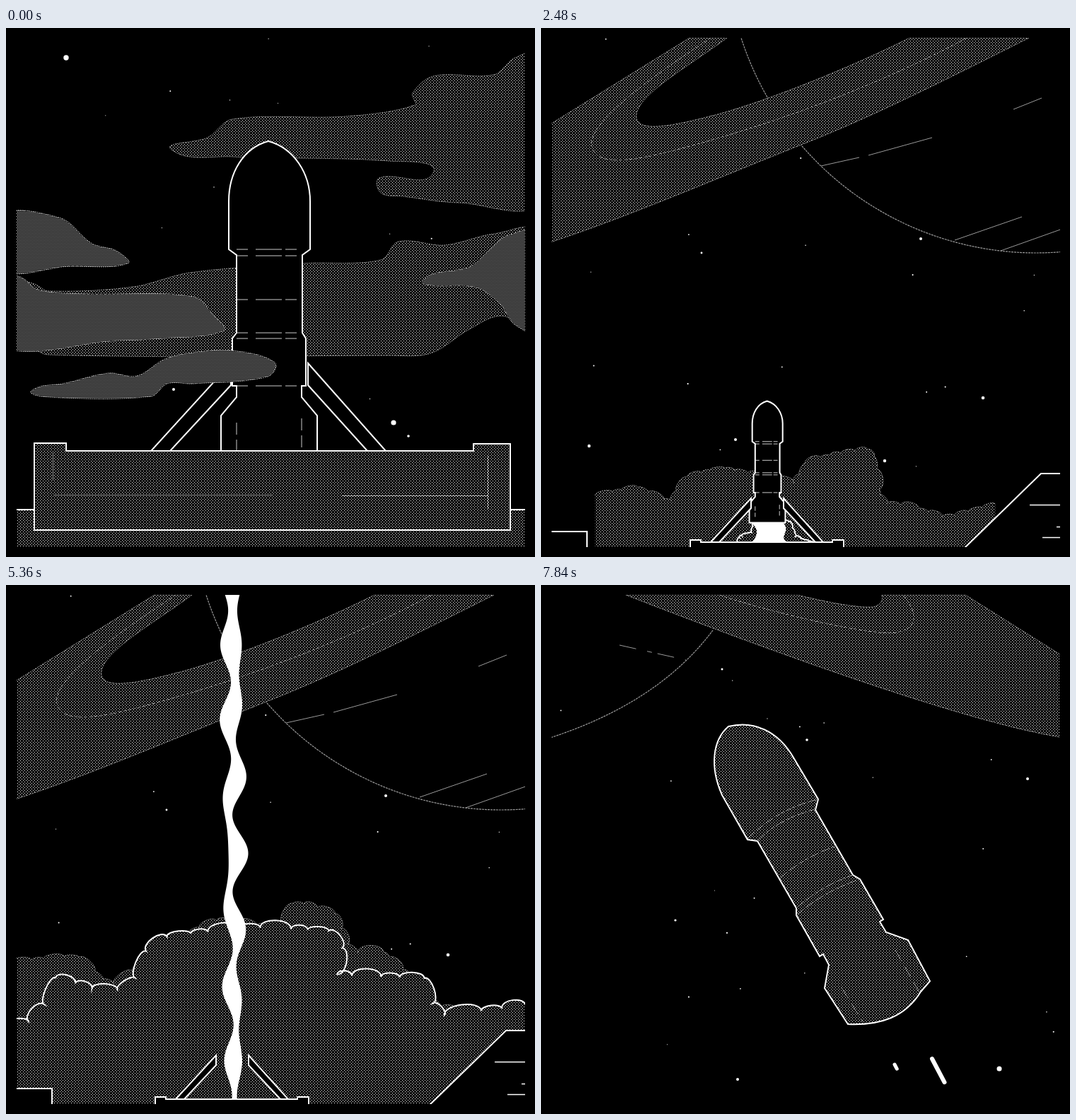
An HTML page with a canvas that plays this animation: 748 px wide and 748 px high, repeating every 8 s.

```html
<!DOCTYPE html>
<html lang="en">
<head>
<meta charset="utf-8">
<title>Lift-off</title>
<style>
  html, body { margin: 0; height: 100%; background: #000; overflow: hidden; }
  canvas { display: block; width: 748px; height: 748px; }
</style>
</head>
<body>
<canvas id="stage" width="748" height="748"></canvas>
<script>
const ctx = document.getElementById('stage').getContext('2d');
const LOOP = 8000, STEP = 80, LAUNCH_AT = 800, SPACE_AT = 5600;
const WHITE = '#fff', SOFT = '#999', BLACK = '#000', TAU = Math.PI * 2;

// ---------- helpers ----------
function dotScreen(width, height, rowShift) {
  const tile = document.createElement('canvas');
  tile.width = width;
  tile.height = height * 2;
  const g = tile.getContext('2d');
  g.fillRect(0, 0, width, height * 2);
  g.fillStyle = WHITE;
  g.fillRect(0, 0, 1, 1);
  g.fillRect(rowShift, height, 1, 1);
  return ctx.createPattern(tile, 'repeat');
}
const DIM = dotScreen(4, 2, 2), BRIGHT = dotScreen(2, 2, 1);

const mix = (a, b, k) => a + (b - a) * k;
const random = n => { const s = Math.sin(n * 12.9898) * 43758.5453; return s - Math.floor(s); };
const points = text => text.trim().split(/\s+/).map(p => p.split(',').map(Number));

function shape(d, fill, stroke, width = 1, dash = []) {
  const path = typeof d === 'string' ? new Path2D(d) : d;
  if (fill) { ctx.fillStyle = fill; ctx.fill(path); }
  if (stroke) {
    ctx.strokeStyle = stroke;
    ctx.lineWidth = width;
    ctx.setLineDash(dash);
    ctx.stroke(path);
  }
}
function disc(x, y, r) {
  ctx.fillStyle = WHITE;
  ctx.beginPath();
  ctx.arc(x, y, r, 0, TAU);
  ctx.fill();
}
function stars(seed, bright) {
  for (let i = 0; i < 26; i++) {
    const n = seed + i * 3;
    disc(15 + 719 * random(n), 15 + 640 * random(n + 1), 0.5 + 0.6 * random(n + 2));
  }
  for (const [x, y, r] of bright) disc(x, y, r);
}

// Closed smooth curve through a few points.
function smooth(list) {
  const path = new Path2D(), n = list.length, at = i => list[(i + n) % n];
  const handle = (i, reach) => {
    const [ax, ay] = at(i - 1), [bx, by] = at(i + 1), [x, y] = at(i);
    const size = reach / Math.hypot(bx - ax, by - ay);
    return [x + (bx - ax) * size, y + (by - ay) * size];
  };
  path.moveTo(...at(0));
  for (let i = 0; i < n; i++) {
    const [p, q] = [at(i), at(i + 1)], reach = 0.33 * Math.hypot(q[0] - p[0], q[1] - p[1]);
    path.bezierCurveTo(...handle(i, reach), ...handle(i + 1, -reach), ...q);
  }
  return path;
}

// ---------- launch pad, close up ----------
const cloud = text => smooth(points(text));
const farClouds = [
  cloud('760,36 720,42 690,66 605,68 575,92 578,109 480,125 320,129 285,155 234,172 320,182 540,188 604,205 528,212 530,233 562,238 640,247 760,242'),
  cloud('-20,350 40,362 60,372 180,366 260,346 420,333 530,328 555,302 620,307 690,291 760,290 760,425 700,407 655,426 600,460 540,463 60,462 25,447 -20,447')];
const nearClouds = [
  cloud('-20,268 75,268 122,305 156,315 172,333 90,337 -20,340'),
  cloud('-20,350 20,352 45,370 110,376 265,380 295,408 308,428 220,439 160,442 -20,446'),
  cloud('760,291 710,293 682,315 655,338 600,349 590,362 665,367 700,392 720,420 760,430')];
const lowCloud = cloud('36,513 85,502 145,488 185,492 225,468 272,458 320,456 380,473 370,493 265,503 228,503 205,521 60,522');

function rocket(scale) {
  shape('M315,313 V245 C315,205 335,170 371,160 C407,170 430,205 430,245 V313 L419,321 V431 L424,439 V506 H418 V522 L440,548 V620 H304 V548 L326,522 V506 H320 V439 L326,431 V321Z',
    BLACK, WHITE, 2 / scale);
  for (const y of [313, 322, 384, 431, 439, 506]) shape(`M326,${y} H419`, null, WHITE, 0.8 / scale, [16, 11, 37, 5]);
  shape('M326,558 V598 M418,552 V598', null, WHITE, 0.8 / scale, [17, 7]);
}
function drift(list, tone, dx) {
  ctx.save();
  ctx.translate(dx, 0);
  for (const path of list) shape(path, tone, SOFT, 1, [2, 1]);
  ctx.restore();
}
function drawPad(t) {
  const dx = -t / 100;
  stars(5, [[85, 42, 3.7], [548, 558, 3.6], [237, 511, 2], [569, 577, 1.8]]);
  drift(farClouds, DIM, dx / 2);
  drift(nearClouds, BRIGHT, dx);
  shape('M318,474 V505 L232,598 H205Z M427,474 V505 L511,598 H537Z', BLACK, WHITE, 2);
  rocket(1);
  drift([lowCloud], BRIGHT, dx * 1.5);
  shape('M0,681 H748 V748 H0Z', DIM);
  shape('M0,681 H40 M713,681 H748', null, WHITE, 2);
  shape('M40,710 V587 H85 V598 H661 V588 H713 V710Z', DIM, WHITE, 2);
  shape('M67,660.5 H378 M475,661.5 H681 M66.5,600 V640 M681.5,605 V680', null, SOFT);
}

// ---------- lift-off ----------
// Ridge lines of the smoke at a few moments; the puffs are grown along them.
const shrink = (list, k) => list.map(([x, y]) => [mix(320, x, k), mix(760, y, k)]);
const backEarly = points('150,735 165,710 190,685 205,668 250,660 320,690 350,655 435,622 450,690 465,735 500,730 535,735');
const frontEarly = points('212,738 212,690 225,657 268,645 275,603 300,598 345,598 395,607 420,662 478,682 510,692 535,738');
const backSmoke = [
  [900, shrink(backEarly, 0.15)], [1600, backEarly],
  [3280, points('10,594 110,594 175,658 203,607 255,586 395,602 400,570 500,570 508,655 580,624 640,660 740,617')],
  [5360, points('5,534 100,524 148,568 186,542 290,474 388,487 408,447 465,465 487,520 535,520 620,602 740,606')]];
const frontSmoke = [
  [2000, shrink(frontEarly, 0.05)], [3280, frontEarly],
  [4400, points('66,738 90,675 105,630 182,608 235,568 275,502 345,488 410,525 480,592 570,608 595,674 695,648')],
  [5360, points('5,618 50,617 62,553 148,578 195,548 200,500 345,484 480,490 468,552 595,556 608,610 735,595')]];

function ridgeAt(keys, t) {
  let i = 0;
  while (i < keys.length - 2 && t >= keys[i + 1][0]) i++;
  const [t0, a] = keys[i], [t1, b] = keys[i + 1], k = (t - t0) / (t1 - t0);
  return a.map(([x, y], j) => [mix(x, b[j][0], k), mix(y, b[j][1], k)]);
}
function walk(line, share) {
  const sizes = line.slice(1).map(([x, y], i) => Math.hypot(x - line[i][0], y - line[i][1]));
  let left = share * sizes.reduce((a, b) => a + b), i = 0;
  while (i < sizes.length - 1 && left > sizes[i]) left -= sizes[i++];
  const k = left / sizes[i];
  return [mix(line[i][0], line[i + 1][0], k), mix(line[i][1], line[i + 1][1], k)];
}
function smoke(keys, t, count, stroke, width, dash) {
  if (t < keys[0][0]) return;
  const ridge = ridgeAt(keys, t), outline = new Path2D();
  let [px, py] = ridge[0];
  outline.moveTo(px, py);
  for (let i = 1; i <= count; i++) {
    const jitter = i < count ? 0.7 * (random(i + count) - 0.5) : 0;
    const [x, y] = walk(ridge, (i + jitter) / count);
    const lift = mix(0.2, 0.4, random(i * 7 + count));
    const [nx, ny] = [(y - py) * lift, (px - x) * lift];
    outline.bezierCurveTo(px + nx, py + ny, x + nx, y + ny, x, y);
    [px, py] = [x, y];
  }
  const body = new Path2D(outline);
  body.lineTo(px, 760);
  body.lineTo(ridge[0][0], 760);
  shape(body, DIM);
  shape(outline, null, stroke, width, dash);
}

// White column with swellings that sink from the nozzle to the pad.
function drawExhaust(t, nozzle) {
  if (t < 1100) return;
  const top = Math.max(14, Math.min(nozzle, 720)), spread = Math.max(0, (4400 - t) / 1120);
  const flow = 0.266 * (t - 5360), right = [], body = new Path2D();
  for (let y = top; y <= 727; y++) {
    const u = (y - top) / (727 - top);
    const centre = 320 + 3 * u + 7 * Math.sin(Math.PI * u) * Math.cos((y - 380 - flow) / 120 * TAU);
    const half = 11 - 3 * u + 4.5 * Math.cos((y - 85 - flow) / 98 * TAU) / (1 + spread) + spread * (6 + 5 * u ** 6);
    body.lineTo(centre - half, y);
    right.unshift([centre + half, y]);
  }
  for (const p of right) body.lineTo(...p);
  shape(body, WHITE);
}
function drawSparks(t, nozzle) {
  const age = (t - 3140) % 560 + (t < 3140 ? 560 : 0);
  if (t < 1400 || age > 300) return;
  const y = Math.min(nozzle + 20, 585) + age * 0.35;
  for (const side of [-1, 1]) {
    const x = 320 + side * (22 + age * 0.1);
    shape(`M${x},${y} l${side * 13},22`, null, WHITE, 2);
  }
}

function drawLaunch(t) {
  const rise = 359 * (Math.max(0, t - 1600) / 2800) ** 2.32, nozzle = 724 - rise, scale = 0.374;
  stars(90, [[625, 523, 2.3], [537, 298, 2], [227, 318, 1.4], [275, 582, 2], [68, 591, 2.2], [486, 612, 2.2]]);
  const planet = new Path2D();
  planet.arc(700, -120, 438, 0, TAU);
  shape(planet, BLACK, SOFT, 1.2, [3, 1]);
  shape('M396,195 L450,183 M463,180 L553,155 M668,115 L708,99 M585,300 L680,267 M650,315 L740,283', null, SOFT);
  shape('M10,138 L210,14 H263 C200,60 130,98 135,128 C140,150 200,135 250,122 C330,100 450,50 521,14 H690 C570,74 470,125 368,165 C250,212 120,268 10,304Z',
    DIM, SOFT, 1, [3, 1]);
  shape('M240,14 C140,80 60,140 73,170 C80,195 130,188 180,175 C320,140 480,80 602,14', null, SOFT, 1, [5, 2]);

  smoke(backSmoke, t, 36, SOFT, 1, [2, 1]);
  smoke(frontSmoke, t, 27, WHITE, 2);

  ctx.save();
  ctx.translate(320 - 372 * scale, 552 - rise - 160 * scale);
  ctx.scale(scale, scale);
  rocket(scale);
  ctx.restore();
  drawExhaust(t, nozzle);
  drawSparks(t, nozzle);

  shape('M297,665 V679 L252,727 H240Z M343,665 V679 L388,727 H399Z', BLACK, WHITE, 2);
  shape('M211,740 V724 H226 V727 H412 V724 H428 V740Z', BLACK, WHITE, 2);
  shape('M594,740 L707,630 H750 V750Z M0,712 H65 V750 H0Z', BLACK, WHITE, 2);
  shape('M691,674.5 H740 M729,705.5 H740 M709,720.5 H740', null, WHITE, 1.3);
}

// ---------- in space ----------
const AXIS = [0.46, 0.87];

function drawThrust(t) {
  const length = t < 6720
    ? mix(1, 1.5, (6720 - t) / 1120) + 0.12 * Math.sin((6720 - t) / 90)
    : 1 - (t - 6720) / 560;
  for (let s = 0; s < 80 * length; s++) {
    disc(498 + AXIS[0] * s, 607 + AXIS[1] * s, (17 + 6 * Math.cos(s / 80 * TAU)) * Math.min(1, length + 0.2));
  }
}
// Scraps of flame: time, place at that time, width, length.
const embers = [[6720, 584, 584, 14, 0.1], [6720, 607, 629, 9, 0.1], [6720, 396, 648, 5, 12], [6720, 470, 700, 7, 22],
  [7840, 500, 678, 5, 7], [7840, 553, 670, 6, 38]];

function drawEmbers(t) {
  ctx.lineCap = 'round';
  for (const [time, x, y, width, length] of embers) {
    const age = t - time, far = age * 0.08;
    if (Math.abs(age) > 300) continue;
    shape(`M${x + AXIS[0] * far},${y + AXIS[1] * far} l${AXIS[0] * length},${AXIS[1] * length}`, null, WHITE, width);
  }
  ctx.lineCap = 'butt';
}
function drawSpace(t) {
  stars(200, [[648, 684, 3.5], [688, 274, 2], [278, 699, 2], [376, 219, 1.8], [190, 474, 1.6], [256, 119, 1.5]]);
  shape('M243,64 C190,135 110,185 10,217', null, SOFT, 1.2, [3, 1]);
  shape('M111,85 L205,106', null, SOFT, 1, [24, 16, 7, 8]);
  shape('M120,14 H362 C420,28 450,32 470,31 C482,28 484,20 482,14 H600 L740,102 V216 C600,195 300,84 120,14Z', DIM, SOFT, 1, [3, 1]);
  shape('M252,14 C330,40 440,65 490,68 C530,68 538,45 512,14', null, SOFT, 1, [5, 2]);

  drawThrust(t);
  drawEmbers(t);
  ctx.save();
  ctx.translate(0, 0.5 - 0.5 * Math.cos((t - 6720) / 1120 * Math.PI));
  shape('M265,199 C300,190 335,205 357,243 L392,302 L388,317 L441,409 L451,415 L484,472 L479,475 L488,490 L519,501 L550,559 L537,574 C515,610 480,622 434,620 L401,569 L407,536 L399,521 L394,524 L361,466 V456 L306,361 L292,359 L256,296 C238,255 243,218 265,199Z',
    DIM, WHITE, 2);
  shape('M292,358 Q335,315 392,302 M306,361 Q335,330 388,316 M338,413 Q375,382 418,368 M361,456 Q395,425 441,409 M361,466 Q400,432 451,415',
    null, SOFT, 1, [14, 3]);
  shape('M425,568 L455,617 M501,515 L535,575', null, SOFT, 1, [18, 8]);
  ctx.restore();
}

// ---------- playback ----------
const start = performance.now();
function frame() {
  const clock = (performance.now() - start) % LOOP;
  const t = Math.floor(clock / STEP) * STEP;
  ctx.fillStyle = BLACK;
  ctx.fillRect(0, 0, 748, 748);
  ctx.save();
  ctx.beginPath();
  ctx.rect(15, 14, 719, 720);
  ctx.clip();
  (t < LAUNCH_AT ? drawPad : t < SPACE_AT ? drawLaunch : drawSpace)(t);
  ctx.restore();
  requestAnimationFrame(frame);
}
frame();
</script>
</body>
</html>
```
